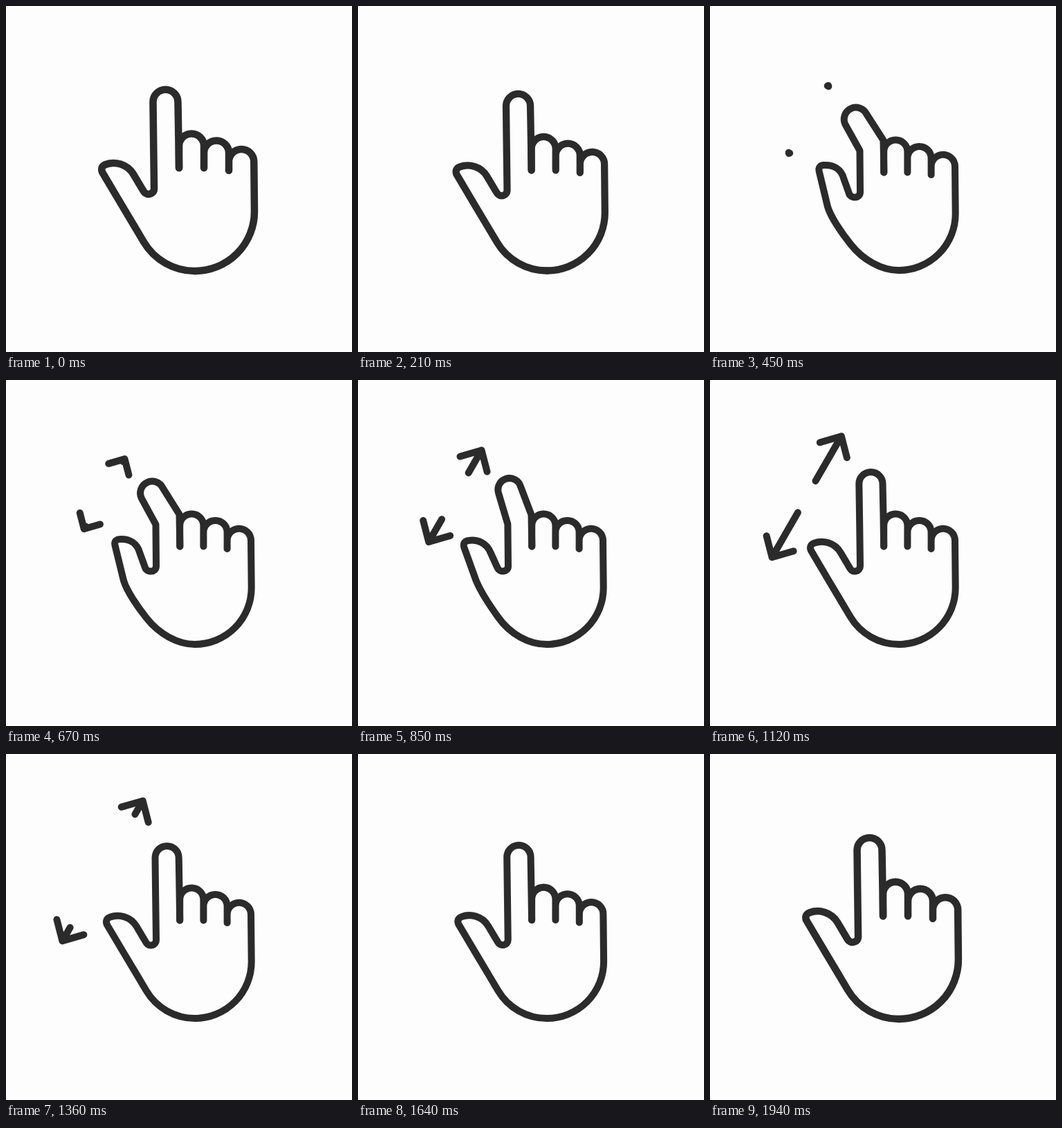
Write an HTML page that moves like this. It is 500 px wide and 500 px high and loops after 2030 ms.

```html
<!DOCTYPE html>
<html lang="en">
<head>
<meta charset="utf-8">
<title>Spread gesture</title>
<style>
  html, body { margin: 0; width: 100%; height: 100%; overflow: hidden; background: #fdfdfd; }
  svg { display: block; width: 100%; height: 100%; }
  path { fill: none; stroke: #2b2b2b; stroke-width: 10; stroke-linecap: round; stroke-linejoin: round; }
</style>
</head>
<body>
<svg viewBox="0 0 500 500">
  <g id="hand">
    <path d="M251.2 240.5V210.5A17.1 17.1 0 0 1 285.4 210.5V240.5
             M285.4 220A17.1 17.1 0 0 1 319.6 220V244
             M319.6 232A17.2 17.2 0 0 1 354 232L354.7 300.3A81.7 81.7 0 0 1 273 382"/>
    <path id="fingers"/>
  </g>
  <path id="upper"/>
  <path id="lower"/>
</svg>
<script>
const LOOP = 2030;
const el = id => document.getElementById(id);
const hand = el('hand'), fingers = el('fingers');

const mix = (a, b, k) => a + (b - a) * k;
const ramp = (t, from, to) => Math.min(1, Math.max(0, (t - from) / (to - from)));
const sine = (t, from, to) => (1 - Math.cos(Math.PI * ramp(t, from, to))) / 2;
const cubic = (t, from, to) => {
  const p = ramp(t, from, to);
  return p < 0.5 ? 4 * p ** 3 : 1 - 4 * (1 - p) ** 3;
};

// Index finger, thumb and left palm edge: command, open points, pinched points
const outline = [
  ['M', [251.2, 240.5], [251.4, 240.5]],
  ['L', [250.5, 196], [250.5, 194]],
  ['L', [249.7, 150], [226, 156]],
  ['A1 1 0 0 0 ', [215.5, 150], [195.5, 171.5]],
  ['L', [216.2, 207], [216.5, 209]],
  ['L', [217, 269], [217, 269]],
  ['C', [217, 277, 206.5, 279, 202.7, 272.8], [217, 279, 203, 278, 201, 271]],
  ['L', [188.5, 249], [193.5, 250]],
  ['C', [179.9, 234.8, 162.8, 231, 150.5, 235.7], [190, 236, 179, 229, 164, 230]],
  ['Q', [142.9, 238.6, 145.7, 246.2], [156, 231, 157.8, 239]],
  ['L', [172, 290.5], [170, 290]],
  ['C', [182, 307, 192.6, 325, 202.7, 342], [174, 304, 190, 328, 203, 344]],
  ['C', [217.4, 366.8, 244.2, 382, 273, 382], [221, 367, 248, 382, 273, 382]]
];

const arrows = [
  { node: el('upper'), side: 1, from: [171, 115], to: [190, 81], out: [201, 62], start: 550 },
  { node: el('lower'), side: -1, from: [114, 213], to: [89.5, 256.5], out: [78, 276], start: 510 }
];

function drawArrow({ node, side, from, to, out, start }, t) {
  const visible = t >= 420 && t < 1580;
  node.style.display = visible ? '' : 'none';
  if (!visible) return;
  const grow = cubic(t, start, 1200), leave = cubic(t, 1170, 1500);
  const [x, y] = from.map((v, i) => mix(mix(v, to[i], grow), out[i], leave));
  const shaft = side * cubic(t, 500, 1200) * (1 - leave);
  const barb = side * Math.max(0.04, cubic(t, 400, 850) * (1 - cubic(t, 1350, 1580)));
  const at = (dx, dy, k) => `${x + dx * k} ${y + dy * k}`;
  node.setAttribute('d',
    `M${at(-31, 9, barb)}L${x} ${y}L${at(8, 31, barb)}M${x} ${y}L${at(-37.5, 65, shaft)}`);
}

function draw(t) {
  const press = sine(t, 0, 420) - sine(t, 1560, 1980);
  const pinch = cubic(t, 200, 480) - cubic(t, 560, 1200);
  const scale = mix(1 / 0.95, 1, press);
  hand.setAttribute('transform', `translate(273 363) scale(${scale}) translate(-273 -363)`);
  fingers.setAttribute('d', outline.map(([cmd, open, shut]) =>
    cmd + open.map((v, i) => mix(v, shut[i], pinch)).join(' ')).join(''));
  arrows.forEach(arrow => drawArrow(arrow, t));
}

function tick() {
  draw(performance.now() % LOOP);
  requestAnimationFrame(tick);
}
tick();
</script>
</body>
</html>
```
